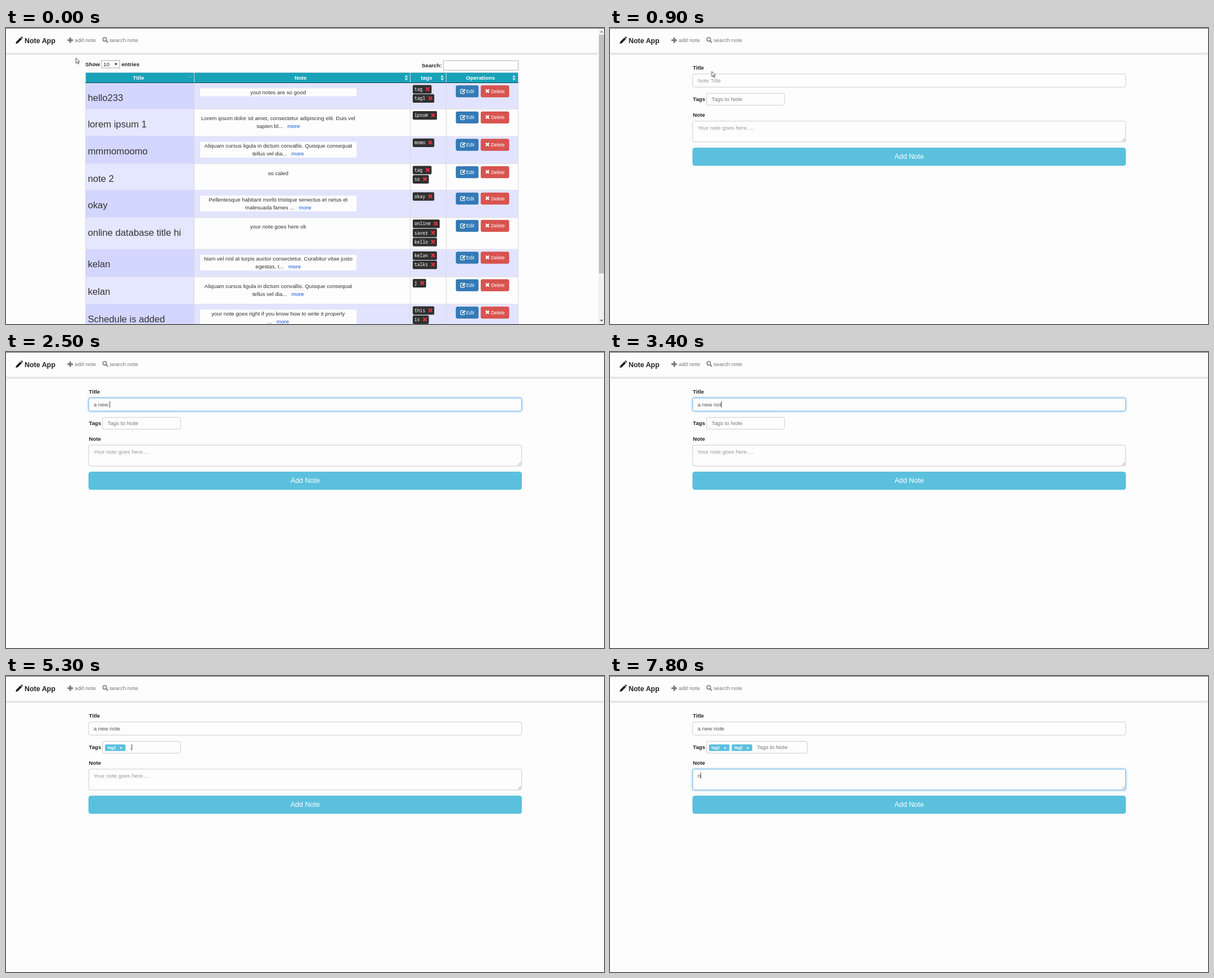
Recreate the animation shown at these times as an HTML page. Size 1063x527 px, loop 8 s.

```html
<!DOCTYPE html>
<html lang="en">
<head>
<meta charset="utf-8">
<title>Note App</title>
<style>
html, body { margin: 0; width: 100%; height: 100%; overflow: hidden; background: #fdfdfd; }
svg { display: block; width: 100%; height: 100%; font: 9.73px "Liberation Sans", Arial, sans-serif; }
.b { font-weight: bold; }
.mono { font: 8.03px "Noto Sans Mono", "DejaVu Sans Mono", monospace; }
.status { font: 7.9px "Open Sans", "Noto Sans", sans-serif; }
.field { fill: #fdfdfd; stroke: #ccc; }
.focus { stroke: #66afe9; filter: drop-shadow(0 0 2.2px rgba(102, 175, 233, .65)); }
.hide { display: none; }
</style>
</head>
<body>
<svg id="stage" viewBox="0 0 1063 527" preserveAspectRatio="none"></svg>
<script>
const LOOP = 8000;
const GAP = "\u00a0";

const rect = (x, y, w, h, fill, extra = "") =>
  `<rect x="${x}" y="${y}" width="${w}" height="${h}" fill="${fill}" ${extra}/>`;
const text = (x, y, s, fill = "#333", extra = "") =>
  `<text x="${x}" y="${y}" fill="${fill}" ${extra}>${s}</text>`;
const path = (d, fill, extra = "") => `<path d="${d}" fill="${fill}" ${extra}/>`;
const group = (id, body, extra = "") => `<g id="${id}" ${extra}>${body}</g>`;
const field = (id, x, y, w, h, r = 2.8) =>
  `<rect id="${id}" class="field" x="${x}" y="${y}" width="${w}" height="${h}" rx="${r}"/>`;
const bold = 'class="b"';
const mid = 'text-anchor="middle"';
const cross = (x, y, r, color) =>
  path(`M${x - r} ${y - r}l${2 * r} ${2 * r}m0 ${-2 * r}l${-2 * r} ${2 * r}`, "none",
    `stroke="${color}" stroke-width="2.3"`);

const plus = color => path("M112.7 17h3v3.2h3.4v3h-3.4v3.2h-3v-3.2h-3.4v-3h3.4z", color);

function navbar() {
  const pencil = path("M17.2 28l.9-3.6 7.4-7.4 2.8 2.8-7.4 7.4zM26.3 16.2l.9-.8q.7-.5 1.3 0l1.3 1.3q.6.6 0 1.3l-.8.9z", "#222");
  const lens = '<circle cx="175.5" cy="20.2" r="3.2" fill="none" stroke="#777" stroke-width="1.5"/>' +
    path("M178 22.7l3.2 3.2", "none", 'stroke="#777" stroke-width="2"');
  const hover = group("hover",
    rect(105, 10.2, 59.5, 24, "#ffc107", 'rx="3" style="filter:drop-shadow(0 0 1.5px rgba(255,193,7,.7))"') +
    plus("#3d3210") + text(122, 25, "add note", "#5b4a17"));
  return rect(0, 0, 1063, 1, "#606060") + pencil +
    text(33, 27, "Note App", "#222", 'class="b" font-size="12.45"') +
    plus("#777") + text(122, 25, "add note", "#777") + hover +
    lens + text(184, 25, "search note", "#777");
}

const shade = w =>
  path(`M0 43.5Q1 44 3 44H${w - 3}Q${w - 1} 44 ${w} 43.5V44.5Q${w} 48 ${w - 4} 48H4Q0 48 0 44.5z`, "#e7e7e7");

const edges = [141.5, 334.5, 718.5, 782.5, 910.5];
const tops = [97.8, 144.3, 193, 241.7, 288.7, 337.3, 394, 443, 491.7, 540];
const rows = [
  ["hello233", ["yout notes are so good"], "tag tag1"],
  ["lorem ipsum 1", ["Lorem ipsum dolor sit amet, consectetur adipiscing elit. Duis vel", "sapien bl..."], "ipsum"],
  ["mmmomoomo", ["Aliquam cursus ligula in dictum convallis. Quisque consequat", "tellus vel dia..."], "momo"],
  ["note 2", ["so caled"], "tag so"],
  ["okay", ["Pellentesque habitant morbi tristique senectus et netus et", "malesuada fames ..."], "okay"],
  ["online database title hi", ["your note goes here ok"], "online saver kello"],
  ["kelan", ["Nam vel nisl at turpis auctor consectetur. Curabitur vitae justo", "egestas, t..."], "kelan talks"],
  ["kelan", ["Aliquam cursus ligula in dictum convallis. Quisque consequat", "tellus vel dia..."], "j"],
  ["Schedule is added", ["your note goes right if you know how to write it properly", "..."], "this is"]
];

function tagChip(word, y) {
  const w = word.length * 4.82 + 19;
  return rect(723, y - 7.6, w, 15.2, "#303030", 'rx="2"') +
    text(726, y + 2.6, word, "#fff", 'class="mono"') + cross(723 + w - 7, y - .4, 3, "#e0323c");
}

function buttons(y) {
  const icon = path(`M813.2 ${y - 3.6}h-3.6q-1.6 0-1.6 1.6v4.2q0 1.6 1.6 1.6h4q1.6 0 1.6-1.6v-1.6`, "none",
    'stroke="#fff" stroke-width="1.2"') +
    path(`M810.8 ${y + 1.6}l.4-2 4-4 1.7 1.7-4 4z`, "#fff");
  return rect(800, y - 10.2, 39.6, 20.4, "#337ab7", 'rx="2.2" stroke="#2e6da4" stroke-width=".7"') + icon +
    text(818, y + 2.9, "Edit", "#fff", 'font-size="8.34"') +
    rect(844.3, y - 10.2, 49.7, 20.4, "#d9534f", 'rx="2.2" stroke="#d43f3a" stroke-width=".7"') +
    cross(855.8, y - .7, 2.8, "#fff") + text(862.3, y + 2.9, "Delete", "#fff", 'font-size="8.34"');
}

function tableRow([title, lines, tags], i) {
  const y = tops[i], h = tops[i + 1] - y, odd = i % 2 === 0;
  let out = rect(141.5, y, 193, h, odd ? "#d3d6ff" : "#e5e6ff");
  if (odd) {
    out += rect(334.5, y, 576, h, "#e2e4ff") +
      rect(345, y + 9.8, 278, lines.length * 13.9, "#fdfdfd");
  }
  out += text(145.4, y + 32.2, title, "#333", 'font-size="16.67"');
  lines.forEach((line, n) => {
    const more = n ? GAP.repeat(3) + '<tspan fill="#1155dd">more</tspan>' : "";
    out += text(483.8, y + 20 + n * 13.9, line + more, "#333", mid);
  });
  tags.split(" ").forEach((tag, n) => { out += tagChip(tag, y + 11.3 + n * 16.3); });
  return out + buttons(y + 15) + rect(141, y + h - .5, 770, 1, "#ddd");
}

function sorter(x) {
  return path(`M${x - 3} 87.8l3-4.4 3 4.4zM${x - 3} 89.6l3 4.4 3-4.4z`, "#c4e5ea");
}

function listPage() {
  const heads = [["Title", 235.5], ["Note", 523.7], ["tags", 747.6], ["Operations", 843.4]];
  return shade(1053) +
    text(141, 67.6, "Show", "#222", bold) + rect(169.5, 57.8, 32.6, 13.2, "#fdfdfd", 'stroke="#a9a9a9"') +
    text(173, 67.8, "10", "#222") + path("M193.2 62.8h4.6l-2.3 4z", "#222") +
    text(205.2, 67.6, "entries", "#222", bold) +
    text(739, 69.8, "Search:", "#222", bold) + rect(777.5, 58.2, 133, 17, "#fdfdfd", 'stroke="#b4b4b4"') +
    rows.map(tableRow).join("") +
    rect(141, 79.5, 770, 18, "#17a2b8") +
    edges.map(x => rect(x - .5, 79.5, 1, 448, "#d8d8df")).join("") +
    rect(141, 79.3, 770, .7, "#9fc5cc") + rect(141, 97, 770, 1, "#123f47") +
    heads.map(([s, x]) => text(x, 91.7, s, "#fff", `${bold} ${mid}`)).join("") +
    path("M324.6 88l2.7-4 2.7 4z", "#5ba9b6") + [711.6, 775.4, 903].map(sorter).join("") +
    rect(1053, 1, 10, 526, "#f1f1f1") + rect(1054, 12, 9, 425, "#c1c1c1") +
    path("M1056 8l2.7-3.2 2.7 3.2z", "#8a8a8a") + path("M1056 519.5l2.7 3.2 2.7-3.2z", "#505050") +
    group("status", path("M0 512.8H75q2.5 0 2.5 2.5V527H0z", "#3c3f41") +
      text(2, 522.8, "localhost:8080/add", "#bfc1c3", 'class="status"'));
}

function tagLabel(id, x, word) {
  return group(id, rect(x, 121.8, 36.4, 11.8, "#5bc0de", 'rx="1.6"') +
    `<g class="b" font-size="7.3">${text(x + 4.5, 130.2, word, "#fff")}${text(x + 26.4, 130.2, "x", "#fff")}</g>`);
}

function formPage() {
  return shade(1063) +
    text(147.2, 74.4, "Title", "#222", bold) + field("titleBox", 146.9, 81.9, 769.8, 23.3) +
    text(147.2, 129.6, "Tags", "#222", bold) + field("tagBox", 171.6, 116.4, 138.6, 21) +
    text(147.2, 158.4, "Note", "#222", bold) + field("noteBox", 146.9, 165.8, 769.8, 37.2) +
    path("M910 201.6l5.6-5.6m-2.6 5.6l2.6-2.6", "none", 'stroke="#777" stroke-width=".8"') +
    rect(147, 213.5, 769.6, 31.4, "#5bc0de", 'rx="4" stroke="#46b8da" stroke-width=".7"') +
    text(531.8, 233.2, "Add Note", "#fff", `font-size="12.5" ${mid}`) +
    tagLabel("tag1", 176, "tag1") + tagLabel("tag2", 216.4, "tag2") +
    '<text id="titleText" x="155.7" y="96.7"/><text id="tagText" x="180.6" y="130"/>' +
    '<text id="noteText" x="155.7" y="180.6"/>' +
    rect(0, 0, .9, 11, "#333", 'id="caret"');
}

function pointers() {
  return group("arrow", path("M0 0V9.4L2.2 7.4 3.8 10.8 5.3 10.1 3.8 6.8H6.6z", "#fff", 'stroke="#222" stroke-width=".8"')) +
    group("hand", path("M1.6 7V1.2Q2.5-.3 3.4 1.2V5Q4.3 4.2 5 5.2 6 4.5 6.6 5.6 7.8 5.2 8 6.4V9.2Q7.8 10.8 6.9 12.6H2.9Q2.4 11-.3 7.8-.2 6.4 1.6 7z",
      "#fff", 'stroke="#222" stroke-width=".8"')) +
    group("beam", path("M-2-6Q0-6 0-5Q0-6 2-6M0-5V5M-2 6Q0 6 0 5Q0 6 2 6", "none", 'stroke="#333" stroke-width=".9"'));
}

const stage = document.getElementById("stage");
stage.innerHTML = rect(0, 0, 1063, 527, "#fdfdfd") + group("list", listPage()) +
  group("form", formPage()) + navbar() + pointers();
const el = {};
stage.querySelectorAll("[id]").forEach(n => { el[n.id] = n; });

// Each step changes only the listed properties of the state before it.
const steps = [
  [0, { page: "list", mouse: ["arrow", 124.3, 53.4], hover: 0, title: "", tag: "", note: "", tags: 0, focus: "" }],
  [400, { mouse: ["arrow", 125, 45] }],
  [500, { mouse: ["hand", 125.3, 29], hover: .6 }],
  [600, { mouse: ["hand", 125, 27], hover: 1 }],
  [900, { page: "form", mouse: ["arrow", 181, 77.4], hover: 0 }],
  [1000, { mouse: ["beam", 184, 93], focus: "title" }],
  [1100, { mouse: null, title: "a" }],
  ...typing("title", "a new note", 2, [1300, 1800, 2000, 2200, 2500, 2800, 3000, 3400, 3700]),
  [3700, { mouse: ["beam", 184, 122.5] }],
  [4000, { mouse: null, focus: "tag" }],
  ...typing("tag", "tag1", 1, [4000, 4200, 4500, 4800]),
  [5300, { tags: 1 }],
  ...typing("tag", ",tag2", 1, [5300, 5700, 5900, 6200, 6600]),
  [7100, { tags: 2, tag: "," }],
  [7600, { tag: "", focus: "note" }],
  [7800, { note: "n" }]
];

function typing(key, word, from, times) {
  return times.map((t, i) => [t, { [key]: word.slice(0, from + i) }]);
}

const show = (node, on) => node.classList.toggle("hide", !on);

function fill(node, value, hint, hintColor) {
  node.textContent = (value || hint).replace(/ /g, GAP);
  node.setAttribute("fill", value ? "#555" : hintColor);
}

function draw(s) {
  show(el.list, s.page === "list");
  show(el.form, s.page === "form");
  show(el.status, s.hover > 0);
  el.hover.setAttribute("opacity", s.hover);
  for (const kind of ["arrow", "hand", "beam"]) {
    const on = s.mouse && s.mouse[0] === kind;
    show(el[kind], on);
    if (on) el[kind].setAttribute("transform", `translate(${s.mouse[1]} ${s.mouse[2]})`);
  }
  if (s.page !== "form") return;

  show(el.tag1, s.tags > 0);
  show(el.tag2, s.tags > 1);
  el.tagText.setAttribute("x", 180.6 + s.tags * 40.2);
  el.tagBox.setAttribute("width", (s.tag ? 98.4 : 138.6) + (s.tags ? s.tag ? s.tags * 40.3 : (s.tags - 1) * 40.3 : 0));
  fill(el.titleText, s.title, "Note Title", "#999");
  fill(el.tagText, s.tag, "Tags to Note", "#777");
  fill(el.noteText, s.note, "Your note goes here.....", "#999");
  el.titleBox.classList.toggle("focus", s.focus === "title");
  el.noteBox.classList.toggle("focus", s.focus === "note");

  show(el.caret, s.focus);
  if (s.focus) {
    const node = el[s.focus + "Text"];
    const width = s[s.focus] ? node.getComputedTextLength() : 0;
    el.caret.setAttribute("x", +node.getAttribute("x") + width - .2);
    el.caret.setAttribute("y", +node.getAttribute("y") - 8.8);
  }
}

let last = -1;
function tick() {
  const t = performance.now() % LOOP;
  const count = steps.filter(([at]) => at <= t).length;
  if (count !== last) {
    last = count;
    draw(Object.assign({}, ...steps.slice(0, count).map(step => step[1])));
  }
  requestAnimationFrame(tick);
}
tick();
</script>
</body>
</html>
```
